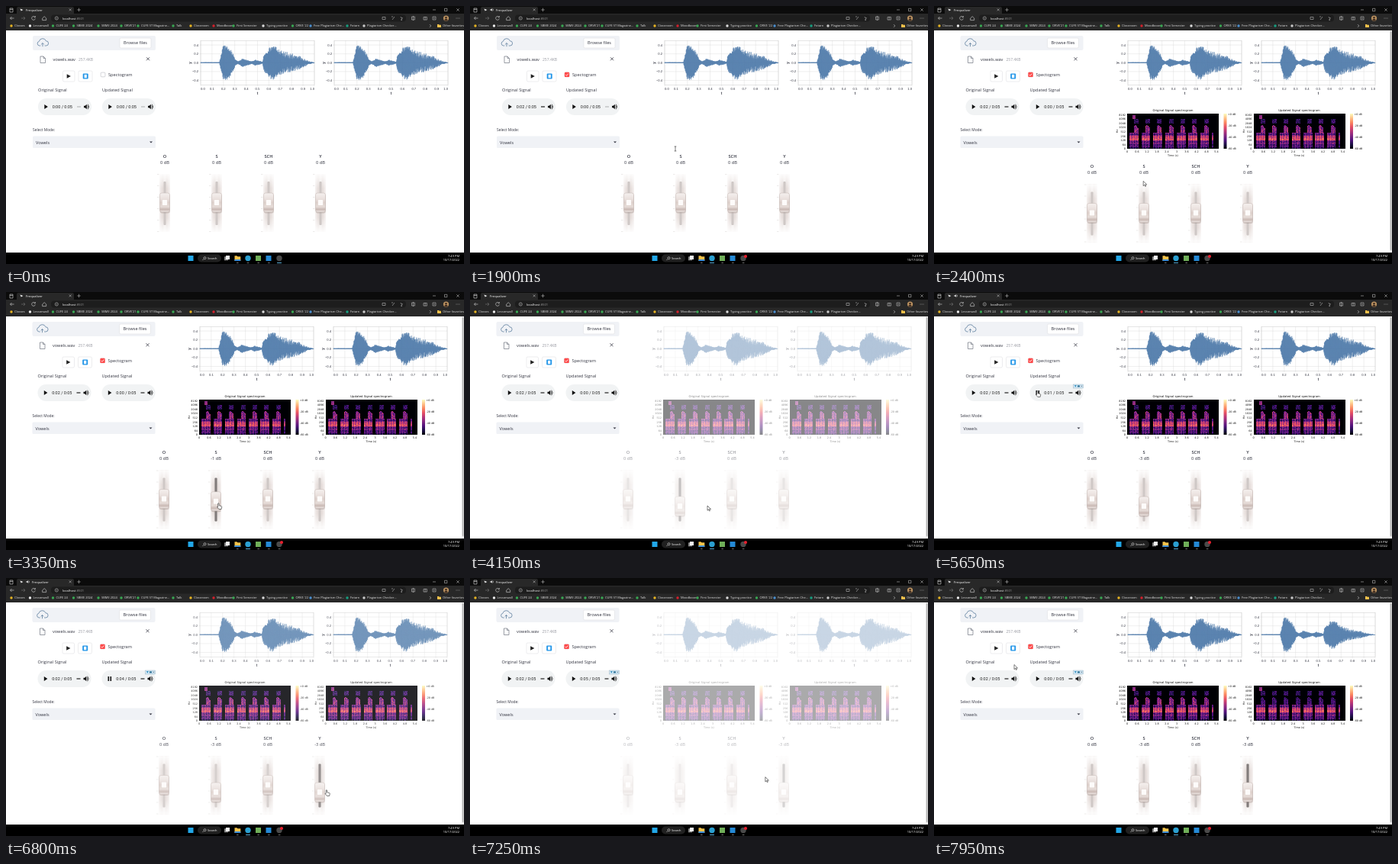
Recreate the animation shown at these times as an HTML page with a canvas. Size 600x338 px, loop 8000 ms.

```html
<!DOCTYPE html>
<html lang="en">
<head>
<meta charset="utf-8">
<title>Equalizer demo</title>
<style>
  html, body { margin: 0; width: 100%; height: 100%; overflow: hidden; background: #fff; }
  #stage { position: relative; width: 600px; height: 338px; overflow: hidden; }
  canvas, svg { position: absolute; }
  svg { left: 0; top: 0; }
  text { font-family: "Open Sans", sans-serif; fill: #31333f; white-space: pre; }
  .axis text { font-family: "Liberation Sans", Arial, sans-serif; }
  .mpl text { font-family: "DejaVu Sans", sans-serif; fill: #111; }
  .player text { font-family: Roboto, sans-serif; fill: #222; }
</style>
</head>
<body>
<div id="stage"></div>
<script>
const LOOP = 8000;
const stage = document.getElementById('stage');
const $ = id => document.getElementById(id);

// ---------- markup helpers ----------
const text = (x, y, s, size, extra = '') =>
  `<text x="${x}" y="${y}" font-size="${size}" ${extra}>${s}</text>`;
const rect = (x, y, w, h, fill, extra = '') =>
  `<rect x="${x}" y="${y}" width="${w}" height="${h}" fill="${fill}" ${extra}/>`;
const dot = (x, y, r, fill, extra = '') => `<circle cx="${x}" cy="${y}" r="${r}" fill="${fill}" ${extra}/>`;
const path = (d, fill, extra = '') => `<path d="${d}" fill="${fill}" ${extra}/>`;
const line = (d, color, width = .6, extra = '') =>
  `<path d="${d}" fill="none" stroke="${color}" stroke-width="${width}" ${extra}/>`;
const group = (id, body, extra = '') => `<g ${id && `id="${id}"`} ${extra}>${body}</g>`;
const MID = 'text-anchor="middle"', END = 'text-anchor="end"';
const range = n => [...Array(n).keys()];

function random(seed) {
  return () => {
    seed = (seed * 16807) % 2147483647;
    return seed / 2147483647;
  };
}

// ---------- browser window ----------
function browser() {
  const light = '#d8d8d8';
  let s = rect(0, 0, 600, 32, '#282828') + rect(0, 0, 600, 10, '#0b0b0b') +
    path('M14 10V3q0-2 2-2H87q2 0 2 2V10Z', '#282828') +
    rect(59, 11.5, 465, 9, '#1d1d1d', 'rx="4"') +
    line('M5 3h4v5h-4zM5 4.5h4', light) + path('M18.4 3.6l4 1.4-2.6 1.6z', '#eee') +
    line('M82.7 3.4l3 3m0-3l-3 3M95.5 2.7v4.6M93.2 5h4.6', light, .5) +
    line('M559 5h4M574.5 3.3h3.4v3.4h-3.4zM590.3 3.3l3.4 3.4m0-3.4l-3.4 3.4', light, .5) +
    line('M10.5 16h-5m2-2l-2 2 2 2', light) + line('M20 16h5m-2-2l2 2-2 2', '#777') +
    line('M38 14.5a2.4 2.4 0 1 0 .4 2M38.4 13v1.8h-1.8', light) +
    line('M47.7 16l2.5-2.3 2.5 2.3v2.6h-5z', light) +
    dot(66.3, 16, 2.1, 'none', `stroke="${light}" stroke-width=".5"`) + line('M66.3 15.6v1.5M66.3 14.7v.4', light, .5) +
    text(74, 17.6, 'localhost<tspan fill="#999">:8501</tspan>', 4.2, 'style="fill:#fff"') +
    line('M493 14.5h4v3h-4zM506 18l3-4M505 14h2M517 14l.8 1.6 1.7.2-1.3 1.2.3 1.7-1.5-.8', light, .5) +
    line('M531.5 14h4v4h-4zM533.5 13v6M547 14.5h4.4v3.6h-4.4zM549.2 14v4M559 14h4v4h-4zM561 15v2', light, .5) +
    dot(576.5, 16, 3.6, '#b9905f') + dot(576.5, 15.2, 1.3, '#3b2a20') +
    path('M574 18.6q2.5-3.6 5 0l-2.5 1z', '#3b2a20') +
    range(3).map(i => dot(590 + i * 2, 16, .45, light)).join('');
  const marks = [
    [11, 'Classes', '#e6b422'], [35.5, 'Lessonwall', '#eee'], [65.5, 'CUFE 24', '#39a853'],
    [92.5, 'SBME 2024', '#39a853'], [125, 'SBME 2024', '#39a853'], [155, "ORVE'21", '#39a853'],
    [177, 'CUFE ST Magazine...', '#39a853'], [223, 'Talk', '#39a853'], [246, 'Classroom', '#e6b422'],
    [276, 'Moodboxes', '#d5202c'], [302, 'First Semester', '#39a853'], [341, 'Typing practice', '#ddd'],
    [379.5, "ORVE '22", '#39a853'], [403, 'Free Plagiarism Che...', '#4a8fd0'],
    [451, 'Fotarn', '#17a081'], [473, 'Plagiarism Checker...', '#ccc']
  ];
  for (const [x, name, color] of marks)
    s += dot(x - 4, 26, 1.7, color) + text(x, 27.4, name, 4, 'style="fill:#e4e4e4"');
  return s + line('M555 24.2l1.8 1.8-1.8 1.8', light) +
    path('M565 24h2l.7.8h2.3v3.2h-5z', '#f0c04a') +
    text(572, 27.4, 'Other favorites', 4, 'style="fill:#e4e4e4"') +
    group('tabSound', path('M26.5 4.2h1.3l1.4-1.3v4.2l-1.4-1.3h-1.3z', '#ddd') + line('M30.2 3.7q1 1.3 0 2.6', '#ddd', .5)) +
    text(26, 6.6, 'Frequalizer', 4.2, 'id="tabTitle" style="fill:#fff"');
}

function taskbar() {
  const white = 'style="fill:#fff"';
  return rect(0, 323, 600, 15, '#000') + rect(238.5, 327, 7, 7, '#22a7e8') +
    rect(251, 325.5, 31, 10, '#202020', 'rx="5"') +
    line('M258.8 331.6l-1.3 1.4M262 330.2a1.5 1.5 0 1 0-3 0 1.5 1.5 0 0 0 3 0', '#eee', .6) +
    text(264, 332.3, 'Search', 4, white) +
    rect(286, 328.3, 5, 5, '#888') + rect(288, 327, 5, 5, '#f2f2f2') +
    path('M299.5 327.2h3l1 1h3.8v5.8h-7.8z', '#f4c34b') + rect(299.5, 332, 7.8, 2, '#3f8fd8') +
    dot(317, 330.5, 3.7, '#2a9fd0') + rect(327, 327, 7, 7, '#6fae58') + rect(340.5, 327, 7, 7, '#2489d6') +
    dot(358, 330.5, 3.7, '#4a4a4a') +
    range(5).map(i => rect(302 + i * 13.7, 336, 2.6, .8, '#888')).join('') +
    rect(355, 336, 6, .9, '#5cb8e8', 'id="recorderActive"') +
    group('browserActive', rect(314, 336, 6, .9, '#5cb8e8') + dot(361, 328, 2.1, '#e81f2d')) +
    text(594, 328.9, '7:49 PM', 4, white + END) + text(594, 334.4, '10/17/2022', 4, white + END);
}

// ---------- left column ----------
const player = (id, x) => group(id,
  rect(x, 121, 70, 22, '#f1f3f4', 'rx="11"') +
  path(`M${x + 8.3} 129v6l4.6-3z`, '#111', `id="${id}Play"`) +
  group(id + 'Pause', rect(x + 8, 129, 1.6, 6, '#111') + rect(x + 11, 129, 1.6, 6, '#111')) +
  text(x + 18.7, 134, '', 5.5, `id="${id}Time"`) +
  rect(x + 51, 131.4, 5, 1.2, '#111', `id="${id}Bar"`) +
  path(`M${x + 60} 130.8h1.6l2.2-2v6.4l-2.2-2h-1.6z`, '#111') +
  line(`M${x + 64.7} 130.3q1.5 1.7 0 3.4M${x + 65.2} 128.7q3 3.3 0 6.6`, '#111', .7), 'class="player"');

function controls() {
  const border = 'stroke="#d8d9dd" stroke-width=".5"';
  return rect(35, 39, 161, 19, '#f0f2f6', 'rx="2"') +
    line('M45.3 52h-1.6a2.9 2.9 0 0 1-.3-5.7 4.7 4.7 0 0 1 9-.5 3.1 3.1 0 0 1 .2 6.2H50.7M48 53.2v-4.6m-1.8 1.7l1.8-1.8 1.8 1.8', '#5f7f9f', .8) +
    rect(149, 42, 41, 13, '#fff', 'rx="1.6" ' + border) + text(169.5, 50.4, 'Browse files', 5.55, MID) +
    line('M45 66h4l2.5 2.5v6h-6.5zM49 66v2.5h2.5', '#6f7480', .7) +
    text(61.5, 71.8, 'vowels.wav', 5.6) + text(95, 71.8, '257.4KB', 5, 'style="fill:#999ba3"') +
    line('M184 67.3l4 4m0-4l-4 4', '#31333f', .8) +
    rect(74.5, 85, 15.5, 14, '#fff', 'rx="1.6" ' + border) + path('M79.7 89.2v5.6l5.2-2.8z', '#222') +
    rect(95, 85, 18, 14, '#fff', 'rx="1.6" ' + border) + rect(100.7, 88.5, 7, 7, '#2396e8', 'rx="1"') +
    rect(102.6, 89.8, 3.2, 4.4, '#fff') +
    rect(124.2, 87.1, 5.7, 5.7, '#fff', 'rx="1" stroke="#a9abb3" stroke-width=".5"') +
    group('checked', rect(123.9, 86.8, 6.3, 6.3, '#ff4b4b', 'rx="1.2"') + line('M125.2 90l1.3 1.3 2.4-2.8', '#fff', .8)) +
    text(134, 92, 'Spectogram', 5.65) + text(42, 112, 'Original Signal', 5.65) +
    text(126, 112, 'Updated Signal', 5.65) + player('first', 42) + player('second', 126) +
    group('badge', rect(183, 121, 13, 5, '#cfe6f4', 'stroke="#8fa9bb" stroke-width=".4"') +
      path('M184.4 122.2h3l-1.5 2.4z', '#2386b8') + rect(188.5, 122.4, 3, 2, '#2c6f93') +
      line('M193 122.5l1.7 1.8m0-1.8l-1.7 1.8', '#345', .4)) +
    text(35, 164.4, 'Select Mode:', 4.9) + rect(35, 170.5, 161, 15.5, '#f0f2f6', 'rx="1.6"') +
    text(39, 180.5, 'Vowels', 5.6) + path('M188 177.4h4l-2 2.2z', '#31333f');
}

// ---------- line charts ----------
const ENVELOPE = [[0, .01], [.165, .012], [.178, .16], [.195, .36], [.215, .42], [.24, .38], [.265, .3], [.285, .2],
  [.305, .07], [.33, .03], [.37, .1], [.41, .06], [.45, .03], [.48, .07], [.52, .04], [.545, .02], [.555, .18],
  [.58, .27], [.625, .4], [.66, .36], [.7, .28], [.8, .22], [.88, .14], [.95, .04], [1, .01]];

function amplitude(t) {
  const i = Math.max(1, ENVELOPE.findIndex(p => p[0] >= t));
  const [t0, a0] = ENVELOPE[i - 1], [t1, a1] = ENVELOPE[i];
  return a0 + (a1 - a0) * (t - t0) / (t1 - t0);
}

// The tail of the second burst is sparser: taller spikes around a thin core.
function wave(id, x0, damped) {
  const next = random(77), steps = 600;
  let d = '';
  for (let i = 0; i <= steps; i++) {
    const t = i / steps, sparse = Math.min(.65, Math.max(.3, (t - .6) * 4));
    let a = amplitude(t) * (1 - sparse * next());
    if (damped && t > .54) a *= 1 - .45 * Math.min(1, (t - .54) / .25);
    d += `${i ? 'L' : 'M'}${(x0 + t * 149).toFixed(2)} ${(74.3 + (i % 2 ? 58 : -58) * a).toFixed(2)}`;
  }
  return line(d, '#4c78a8', .5, `id="${id}" stroke-linejoin="bevel"`);
}

function axes(x0) {
  let grid = '', labels = '';
  for (const v of [.4, .2, 0, -.2, -.4]) {
    const y = 74.3 - v * 58;
    grid += `M${x0} ${y}h149M${x0 - 2} ${y}h2`;
    labels += text(x0 - 2.8, y + 1.5, v.toFixed(1).replace('-', '−'), 4.2, END);
  }
  for (const i of range(11)) {
    const x = x0 + i * 14.9;
    grid += `M${x} 45.3v60`;
    labels += text(x, 110, (i / 10).toFixed(1), 4.2, i === 0 ? '' : i === 10 ? END : MID);
  }
  return line(grid, '#dcdcdc', .45) + rect(x0, 45.3, 149, 58, 'none', 'stroke="#ccc" stroke-width=".5"') +
    group('', labels + text(x0 + 74.5, 115.6, 't', 4.5, MID + ' font-weight="700"') +
      `<text transform="translate(${x0 - 12.5} 74.5) rotate(-90)" font-size="4.5" font-weight="700" ${MID}>y</text>`, 'class="axis"');
}

// ---------- spectrograms ----------
const MAGMA = ['#000004', '#1d1147', '#51127c', '#822681', '#b63679', '#e65164', '#fb8861', '#fec287', '#fcfdbf'];

function spectrogramFrame(x0, title) {
  const rows = ['8192', '4096', '2048', '1024', '512', '256', '128', '64', '0'];
  let s = text(x0 + 60, 138.4, title, 3.8, MID) +
    rect(x0 + 126.5, 141, 4, 46, 'url(#magma)') +
    text(x0 + 60, 196.7, 'Time (s)', 3.4, MID) +
    `<text transform="translate(${x0 - 12} 164) rotate(-90)" font-size="3.4" ${MID}>Hz</text>`;
  rows.forEach((r, i) => s += text(x0 - 2, 143.8 + i * 5.55, r, 3.4, END));
  ['0', '0.6', '1.2', '1.8', '2.4', '3', '3.6', '4.2', '4.8', '5.4'].forEach((v, i) =>
    s += text(x0 + i * 13, 192, v, 3.4, MID));
  ['+0 dB', '-20 dB', '-40 dB', '-60 dB'].forEach((v, i) => s += text(x0 + 132, 142.5 + i * 15.2, v, 3.3));
  return s;
}

// Each syllable is a low voiced block with a taller, fainter tower and a few specks above it.
function spectrogram(id, x, damped) {
  const W = 120, H = 46, PERIOD = 15.4, next = random(4242);
  const canvas = Object.assign(document.createElement('canvas'), { id, width: W, height: H });
  canvas.style.cssText = `left:${x}px;top:141px`;
  const ctx = canvas.getContext('2d');
  for (let px = 0; px < W; px++) {
    const q = (px - 3 + PERIOD) % PERIOD;
    const inside = px > 2 && px < 113;
    const voiced = inside && q < 11.5, tower = inside && q > 5 && q < 11;
    const towerTop = 14 + Math.abs(q - 7);
    const column = .07 * Math.sin(px * 1.9);
    for (let py = 0; py < H; py++) {
      const n = next();
      let v = n * .05;
      if (voiced && py >= 25) {
        const band = Math.exp(-(((py - 32) / 3) ** 2));
        v = .27 + .32 * band + column + .07 * Math.sin(py * 1.35) + .14 * (n - .5) - (py > 42 ? .12 : 0);
      } else if (tower && py > towerTop) {
        v = (.24 + .24 * n + column) * (damped ? .55 : 1);
      } else if (tower && py > 6 && py < 13) {
        v = .08 + .17 * n;
      }
      if (px > 6 && px < 11 && py > 1 && py < 7) v = .3 + .15 * n;
      ctx.fillStyle = MAGMA[Math.max(0, Math.min(8, Math.round(v * 8.6)))];
      ctx.fillRect(px, py, 1, 1);
    }
  }
  stage.append(canvas);
}

// ---------- sliders ----------
const slider = (name, x) => group('',
  text(x, 198.5, name, 5.7, MID + ' font-weight="600"') +
  text(x, 206.7, '0 dB', 5.7, MID + ` id="db${name}"`) +
  rect(x - 7, 220, 14, 76, 'url(#panel)') + rect(x - 7, 220, 14, 76, 'url(#ends)') +
  line(range(6).map(i => `M${x - 10} ${220.5 + i * 15}h2.5`).join(''), '#d9d5d3', .5) +
  rect(x - 1.6, 230, 3.2, 57, '#cfc8c6', `rx="1" id="track${name}"`) +
  group('thumb' + name,
    rect(x - 6.2, 246, 13, 25.5, '#8a7772', 'rx="2.5" opacity=".3"') +
    rect(x - 6.5, 245, 13, 25, 'url(#knob)', 'rx="2.5" stroke="#c3b5b0" stroke-width=".5"') +
    rect(x - 3.2, 254, 6.4, 7, '#fdfbfa', 'rx=".8"')));

const NAMES = ['O', 'S', 'SCH', 'Y'];

const stops = list => list.map(([o, c, a = 1]) => `<stop offset="${o}" stop-color="${c}" stop-opacity="${a}"/>`).join('');
const gradient = (id, vertical, list) =>
  `<linearGradient id="${id}" x2="${vertical ? 0 : 1}" y2="${vertical ? 1 : 0}">${stops(list)}</linearGradient>`;

spectrogram('specFirst', 253);
spectrogram('specSecond', 418.5);
spectrogram('specDamped', 418.5, true);

stage.insertAdjacentHTML('beforeend', `<svg width="600" height="338" viewBox="0 0 600 338"><defs>` +
  gradient('magma', true, MAGMA.map((c, i) => [1 - i / 8, c]).reverse()) +
  gradient('panel', false, [[0, '#f6f2f1'], [.3, '#e5dcd9'], [.5, '#f1ecea'], [.7, '#e5dcd9'], [1, '#f6f2f1']]) +
  gradient('ends', true, [[0, '#fff', .9], [.25, '#fff', 0], [.75, '#fff', 0], [1, '#fff', .9]]) +
  gradient('knob', true, [[0, '#f5f0ee'], [.3, '#eae1de'], [.5, '#dccfca'], [.72, '#e6dcd8'], [.86, '#c9b9b4'], [1, '#efe8e5']]) +
  '</defs>' +
  group('left', controls()) +
  group('charts', axes(255) + wave('waveFirst', 255) + axes(430) + wave('waveSecond', 430) + wave('waveDamped', 430, true)) +
  group('spectra', spectrogramFrame(253, 'Original Signal spectrogram') +
    spectrogramFrame(418.5, 'Updated Signal spectrogram'), 'class="mpl"') +
  group('sliders', NAMES.map((n, i) => slider(n, 208 + i * 68)).join('')) +
  group('scrollbar', rect(597, 32, 3, 291, '#f1f1f1') + rect(597.6, 33, 2, 287, '#b5b5b5', 'rx="1"')) +
  browser() + taskbar() +
  group('cursor',
    path('M0 0v6.2l1.5-1.4 1 2.2 1-.5-1-2.1h2z', '#fff', 'id="arrow" stroke="#111" stroke-width=".55"') +
    path('M-.8 0q.8-1 1.4 0v2.8l3 .7q.8.4.6 1.5l-.6 2.5h-3.2l-2.2-2.7q-.2-1 1-.4z', '#fff', 'id="hand" stroke="#111" stroke-width=".55"') +
    line('M-1.3-3h2.6M0-3v6M-1.3 3h2.6', '#222', .6, 'id="beam"')) + '</svg>');

// ---------- timeline ----------
const RERUNS = [[2050, 2400], [3850, 4650], [6670, 7600]];
const CURSOR = [
  [100, 340, 300, 'arrow'], [450, 52, 132, 'hand'], [1400, 52, 132, 'arrow'], [1650, 127, 90, 'hand'],
  [1770, 127, 90, 'beam'], [1900, 269, 187, 'beam'], [2150, 272, 196, 'arrow'], [2700, 277, 273, 'hand'],
  [3050, 278, 274, 'hand'], [3350, 278.5, 277, 'hand'], [3600, 279, 283, 'hand'], [3750, 279, 283, 'arrow'],
  [4000, 311, 280, 'arrow'], [4600, 311, 280, 'arrow'], [5100, 135.5, 130, 'hand'], [5800, 135.5, 130, 'arrow'],
  [6300, 412, 270, 'hand'], [6450, 413, 271, 'hand'], [6750, 420, 278, 'hand'], [7100, 420, 278, 'arrow'],
  [7850, 105, 113.5, 'arrow'], [8000, 105, 113.5, 'arrow']
];

const show = (id, on) => $(id).style.display = on ? '' : 'none';
const within = (t, from, to) => t >= from && t < to;
const level = (t, times) => -times.filter(at => t >= at).length;

function moveCursor(t) {
  show('cursor', t >= CURSOR[0][0]);
  const i = Math.max(1, CURSOR.findIndex(k => k[0] > t));
  const [t0, x0, y0, kind] = CURSOR[i - 1], [t1, x1, y1] = CURSOR[i];
  const p = Math.max(0, (t - t0) / (t1 - t0)), e = p * p * (3 - 2 * p);
  $('cursor').setAttribute('transform', `translate(${x0 + (x1 - x0) * e} ${y0 + (y1 - y0) * e})`);
  for (const k of ['arrow', 'hand', 'beam']) show(k, k === kind);
}

function setPlayer(id, seconds, playing, active) {
  $(id + 'Time').textContent = `0:0${Math.floor(seconds)} / 0:05`;
  show(id + 'Play', !playing);
  show(id + 'Pause', playing);
  $(id + 'Bar').setAttribute('fill', active ? '#222' : '#b8babc');
}

function setSlider(name, db, focused) {
  $('db' + name).textContent = db + ' dB';
  $('thumb' + name).setAttribute('transform', `translate(0 ${-db * 3.2})`);
  $('track' + name).setAttribute('fill', focused ? '#827c7b' : '#cfc8c6');
}

function render(t) {
  const expanded = t >= 2400, damped = t >= 7600;
  const stale = RERUNS.find(([from, to]) => within(t, from, to));
  const opacity = stale ? 1 - .67 * Math.min(1, (t - stale[0]) / 350) ** 1.5 : 1;

  $('left').setAttribute('transform', `translate(${expanded ? -.5 : 0} 0)`);
  $('charts').setAttribute('transform', `translate(${expanded ? -1 : 0} 0)`);
  $('sliders').setAttribute('transform', expanded ? 'translate(-1 13.5)' : 'translate(0 0)');
  for (const id of ['charts', 'spectra', 'sliders', 'specFirst', 'specSecond', 'specDamped']) $(id).style.opacity = opacity;
  for (const id of ['spectra', 'specFirst', 'scrollbar']) show(id, expanded);
  show('specSecond', expanded && !damped);
  show('specDamped', damped);
  show('waveSecond', !damped);
  show('waveDamped', damped);

  const sound = within(t, 550, 2250) || within(t, 5300, 7500);
  show('tabSound', sound);
  $('tabTitle').setAttribute('x', sound ? 34 : 26);
  show('recorderActive', t < 100);
  show('browserActive', t >= 100);
  show('checked', t >= 1700);
  show('badge', t >= 5200);

  setPlayer('first', Math.min(2.2, Math.max(0, (t - 500) / 400)), within(t, 500, 1400), t >= 500);
  const played = damped ? 0 : Math.min(5, Math.max(0, (t - 5200) / 400));
  setPlayer('second', played, played > 0 && played < 5, expanded);

  setSlider('S', level(t, [3050, 3450, 3600]), within(t, 2700, 5200));
  setSlider('Y', level(t, [6450, 6550, 6650]), t >= 6350);
  moveCursor(t);
}

const start = performance.now();
function tick() {
  render((performance.now() - start) % LOOP);
  requestAnimationFrame(tick);
}
tick();
</script>
</body>
</html>
```
